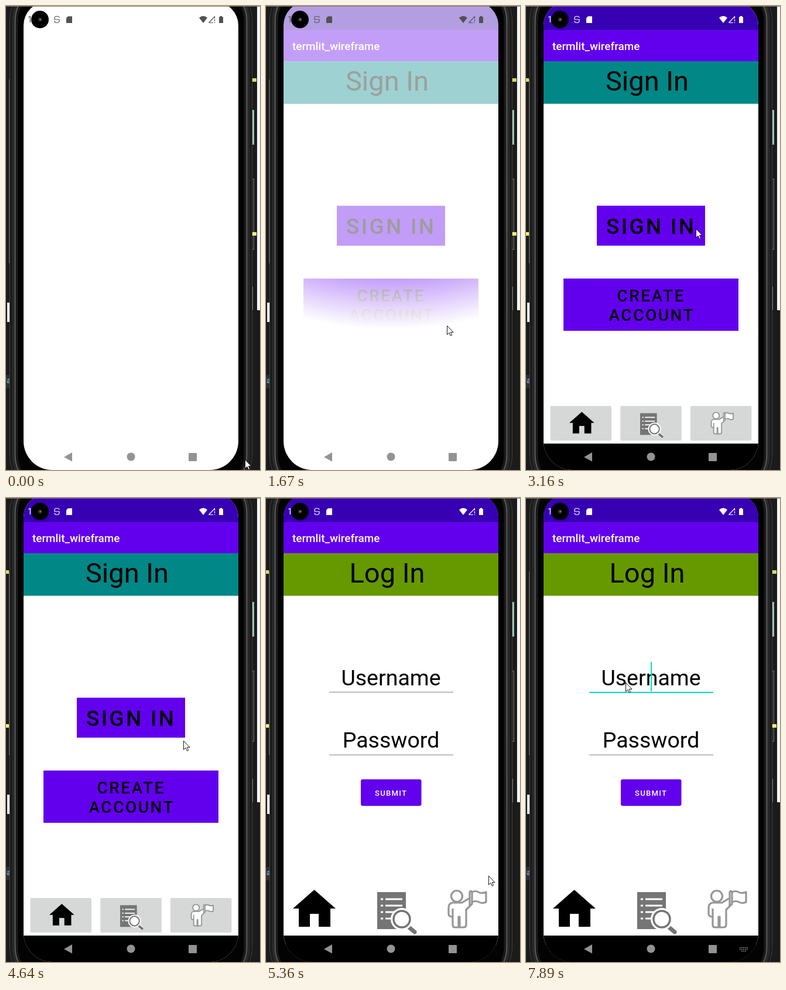
Recreate the animation shown at these times as an HTML page. Size 434x790 px, loop 8000 ms.

```html
<!DOCTYPE html>
<html lang="en">
<head>
<meta charset="utf-8">
<title>Sign in flow</title>
<style>
html, body { margin: 0; width: 100%; height: 100%; overflow: hidden; background: #1b1b1b; }
svg { display: block; width: 100%; height: 100%; }
text { font-family: Roboto, "Open Sans", sans-serif; white-space: pre; }
.m { font-weight: 500; }
</style>
</head>
<body>
<svg id="stage" viewBox="0 0 434 790"></svg>
<script>
const LOOP = 8000, STEP = 127; // ms; all motion advances in steps
const $ = id => document.getElementById(id);

const rect = (x, y, w, h, fill, more = '') =>
  `<rect x="${x}" y="${y}" width="${w}" height="${h}" fill="${fill}" ${more}/>`;
const text = (x, y, size, str, more = '') =>
  `<text x="${x}" y="${y}" font-size="${size}" ${more}>${str}</text>`;
const centered = (x, y, size, str) => text(x, y, size, str, 'text-anchor="middle"');
const spaced = n => `class="m" letter-spacing="${n}"`;
const icons = (x, y, gap, s) => ['home', 'list', 'person'].map((id, i) =>
  `<use href="#${id}" transform="translate(${x + i * gap} ${y + (i % 2) * 4 * s}) scale(${s})"/>`).join('');
const shell = (inset, stroke, width, fill = 'none') =>
  rect(6 + inset, -45 + inset, 415 - 2 * inset, 880 - 2 * inset, fill,
    `rx="${70 - inset}" stroke="${stroke}" stroke-width="${width}"`);

// Page shared by both activities: status bar, app bar, banner, nav bar
const page = (color, heading, body) =>
  rect(30, 41, 367, 720, '#fff') +
  rect(30, -30, 367, 72, '#3700b3') +
  rect(30, 41, 367, 53, '#6200ee') +
  text(45, 75, 18.9, 'termlit_wireframe', 'class="m" fill="#fff"') +
  rect(30, 94, 367, 72.5, color) +
  centered(207, 143.5, 47, heading) +
  body +
  rect(30, 745, 367, 90, '#000');

const signIn = page('#018786', 'Sign In',
  rect(121, 340, 185, 68, '#6200ee') +
  text(137, 388, 37, 'SIGN IN', spaced(3.3)) +
  rect(64, 464, 299, 89, '#6200ee') +
  text(155.5, 503, 28, 'CREATE', spaced(2.5)) +
  text(141.5, 536, 28, 'ACCOUNT', spaced(2.5)) +
  [0, 1, 2].map(i => rect(41.5 + i * 119.7, 681, 104.5, 59, '#d6d7d7', 'rx="2"')).join('') +
  icons(74, 691, 121, .585));

const logIn = page('#669900', 'Log In',
  centered(213.5, 318.5, 37.5, 'Username') +
  centered(213.5, 425, 37.5, 'Password') +
  rect(108, 330, 212, 1, '#868686') + rect(108, 437, 212, 1, '#868686') +
  `<g id="focus">${rect(108, 330, 212, 2, '#03dac5')}${rect(213, 279, 2, 50, '#03dac5')}</g>` +
  rect(163, 481, 101, 44, '#ccc', 'rx="3"') +
  rect(162, 479, 103.5, 45, '#6200ee', 'rx="3"') +
  text(186, 507, 13.2, 'SUBMIT', spaced(1.2) + ' fill="#fff"') +
  icons(46, 667, 132.5, 1).replace('translate(178.5', 'translate(190'));

const defs = `<defs>
  <clipPath id="glass"><path d="M30 33A40 40 0 0 1 70-7H357A40 40 0 0 1 397 33V741A49 49 0 0 1 348 790H79A49 49 0 0 1 30 741Z"/></clipPath>
  <radialGradient id="glow" gradientUnits="userSpaceOnUse" cx="213.5" cy="-42" r="600">
    <stop id="edge" stop-color="#fff"/><stop offset="1" stop-color="#000"/></radialGradient>
  <mask id="reveal" maskUnits="userSpaceOnUse" x="0" y="-30" width="434" height="900">${rect(0, -30, 434, 900, 'url(#glow)')}</mask>
  <path id="home" d="M36.5 0L73 32H64V63H44V41H29V63H10V32H0Z"/>
  <g id="list" fill="none" stroke="#fff" stroke-width="3">
    <path d="M0 0H49V63H0Z" fill="#757575" stroke="none"/>
    <path d="M6 12H10M14 12H43M6 23H10M14 23H43M6 34H10M14 34H30M6 45H10M14 45H24"/>
    <path d="M50 56L64 68" stroke-width="11"/>
    <path d="M52 58L64 68" stroke="#757575" stroke-width="7" stroke-linecap="round"/>
    <circle cx="42" cy="46" r="16" fill="#fff" stroke-width="6"/>
    <circle cx="42" cy="46" r="14" fill="#fff" stroke="#757575" stroke-width="3.5"/>
  </g>
  <g id="person" fill="#fff" stroke="#969696" stroke-width="3.2" stroke-linejoin="round">
    <path d="M8 22H24L37 14V4Q39 0 41 4Q47 1 52 4T65 4V21Q58 24 53 21T41 21V24L31 34V60Q31 64 26 64H20V46H18V64H12Q8 64 8 60V46Q1 46 1 41V31Q1 23 8 22Z"/>
    <circle cx="15" cy="11" r="9.5"/>
    <path d="M8 32V46M37 14V27M41 4V21" fill="none"/>
  </g>
</defs>`;

const backdrop =
  rect(0, 0, 434, 790, '#1b1b1b') +
  rect(5, 125, 1, 313, '#666') + rect(0, 628, 6, 23, '#2c2f33') +
  text(-2, 642, 13, 'la', 'fill="#9cdcfe"') +
  rect(2, 505, 5, 33, '#fff') +
  rect(421, 177, 3, 59, '#9cc5b8') +
  rect(415.5, 294.5, 8, 120, '#222', 'stroke="#777"') +
  rect(421, 478, 1, 40, '#777') +
  rect(429, 0, 5, 518, '#f4f4f4') +
  `<g id="marks">${rect(0, 123, 7, 6, '#d5d96a')}${rect(0, 385, 7, 6, '#f4ef72')}</g>`;

const body =
  shell(.5, '#444', 1, '#111') + shell(3, '#1c1c1c', 3) + shell(6, '#2c2c2c', 3) +
  shell(9.5, '#555', 2.5) + shell(13, '#1a1a1a', 3, '#030303');

const status = `<g id="status" fill="currentColor">
  ${text(37, 28, 14, '1')}
  <g fill="none" stroke="currentColor" stroke-width="1.2">
    <path d="M91 20Q91 17.500 87 17.500T83 20V23H91V25Q91 28.500 87 28.500T83 25.500"/>
    <path d="M346.500 28.500L356.500 18V21M346.500 28.500H354M356.500 22.500V26M356.500 27.500V29"/>
  </g>
  <path d="M106 17.500H113V29H103V20.500Z"/>
  <path d="M330 20Q337 14 344 20L337 29Z"/>
  <path d="M364 18.500H366V17H369V18.500H371V29H364Z"/>
</g>`;

const hardware = `<circle cx="58" cy="23" r="15"/>
  <circle cx="58" cy="23" r="4" fill="#1c1a1a"/><circle cx="58.5" cy="23" r="1.8" fill="#8a705c"/>
  <g fill="#939393"><path d="M99 768L113 760V775.500Z"/><circle cx="213.5" cy="767.5" r="7"/>
  ${rect(312, 761, 14, 14, '#939393', 'rx="1"')}</g>
  <path id="keys" d="M365 765.500H379M365 768.500H379M368 771.500H376" stroke="#939393" stroke-width="1.6" stroke-dasharray="1.8 1.2"/>`;

$('stage').innerHTML = defs + backdrop + body +
  `<g clip-path="url(#glass)">${rect(30, -10, 367, 800, '#fff')}
    <g id="shown" mask="url(#reveal)"><g id="first">${signIn}</g></g>
    ${rect(30, -10, 367, 800, '#000', 'id="dim" opacity=".17"')}
    <g id="second">${logIn}</g></g>` +
  status + hardware + rect(0, 0, 434, 1, '#777') +
  `<path id="arrow" d="M.5.5V15.500L4 12.300 6.300 17.500 8.600 16.500 6.400 11.400H11Z" fill="#fff" stroke="#000" stroke-width=".9"/>`;

// Pointer moves: start, end, x, y
const moves = [
  [1540, 1670, 309, 544], [1670, 2470, 330, 397], [2780, 3160, 290, 379],
  [3285, 3540, 138, 286], [4095, 4340, 700, 880], [4360, 4490, 323, 640],
  [4510, 4640, 303, 413], [4790, 4920, 395, 483], [4960, 5090, 380, 643],
  [5540, 5670, -50, 140], [6070, 6200, 12, 140], [6480, 6720, 131, 452],
  [6720, 7240, 170, 314]];

const set = (id, attrs) => { for (const k in attrs) $(id).setAttribute(k, attrs[k]); };
const show = (id, on) => set(id, { visibility: on ? 'visible' : 'hidden' });
const zoom = s => `translate(213.5 376) scale(${s}) translate(-213.5 -376)`;

// Progress from 0 to 1 in equal steps of about STEP
function progress(t, start, end) {
  const n = Math.round((end - start) / STEP);
  const p = Math.min(1, Math.max(0, (t - start) / (end - start)));
  return Math.floor(p * n) / n;
}

function draw(t) {
  let x = 408, y = 772;
  for (const [start, end, toX, toY] of moves) {
    const p = progress(t, start, end);
    x += (toX - x) * p;
    y += (toY - y) * p;
  }
  set('arrow', { transform: `translate(${x} ${y})` });

  const p = progress(t, 1285, 1920);
  const solid = 415 + 125 * p + 900 * p ** 8;
  const opening = t >= 5090 && t < 5360;
  set('shown', { opacity: t < 1160 ? 0 : .31 + .69 * p ** 4.5 });
  set('first', { transform: opening ? zoom(1.045) : `translate(0 ${5.3 * (1 - p) ** 4})` });
  set('glow', { r: solid + 88 });
  set('edge', { offset: solid / (solid + 88) });
  set('second', { transform: opening ? zoom(.98) : '' });

  const gray = Math.round(82 + 173 * progress(t, 1950, 2190));
  set('status', { color: `rgb(${gray},${gray},${gray})` });
  set('marks', { transform: `translate(${t >= 2070 && t < 5520 ? -2 : 421} 0)` });
  show('dim', opening);
  show('second', t >= 5090);
  show('focus', t >= 7500);
  show('keys', t >= 7890);
}

const start = performance.now();
function tick() {
  draw((performance.now() - start) % LOOP);
  requestAnimationFrame(tick);
}
tick();
</script>
</body>
</html>
```
